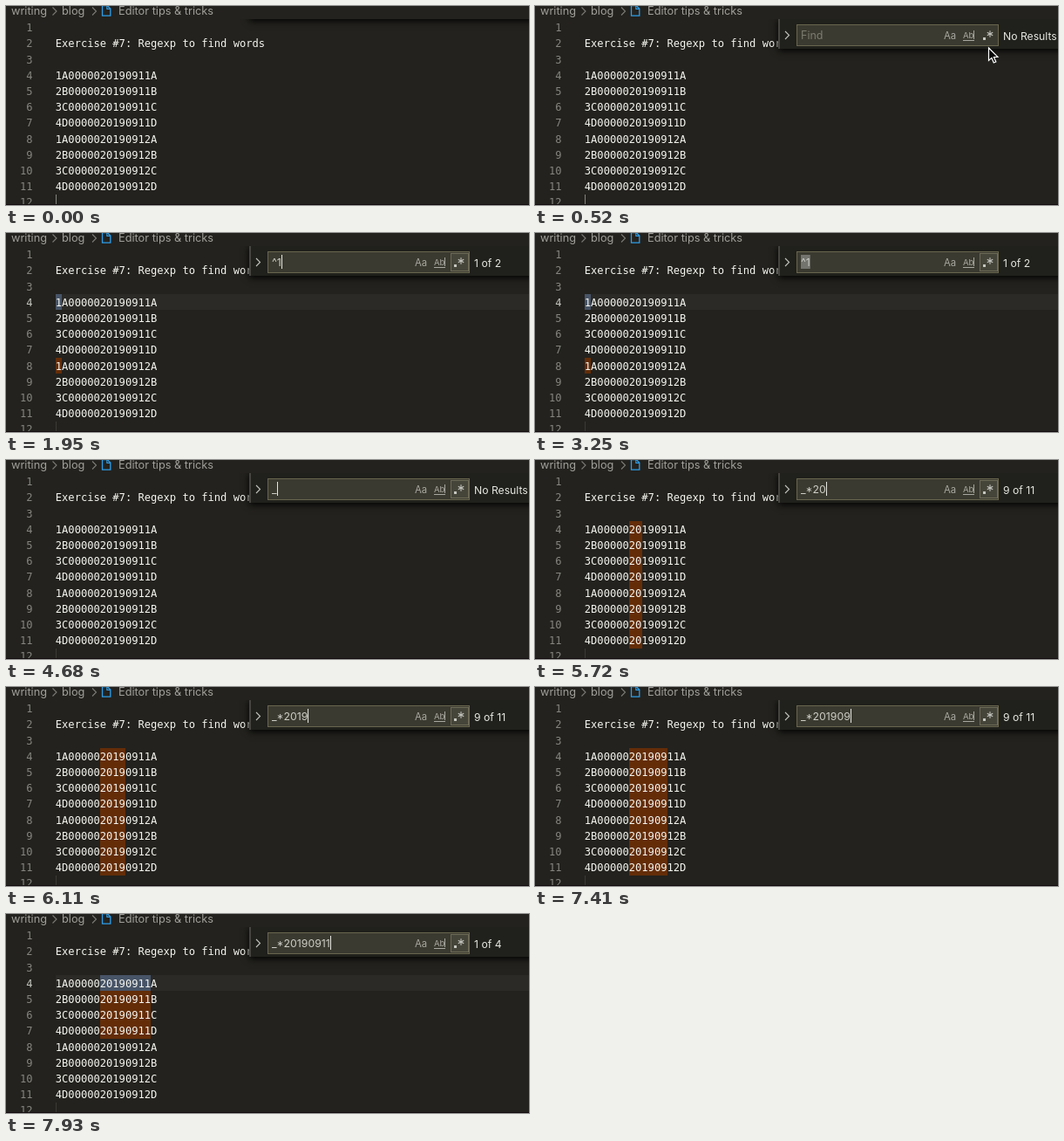
These frames come from a looping animation (600x228 px, 8 s). An HTML page with a canvas:

```html
<!DOCTYPE html>
<html lang="en">
<head>
<meta charset="utf-8">
<title>Regexp search</title>
<style>
html, body { margin: 0; width: 100%; height: 100%; overflow: hidden; background: #23221e; }
canvas { display: block; }
</style>
</head>
<body>
<canvas id="stage"></canvas>
<script>
const W = 600, H = 228, LOOP = 8000, STEP = 130;
const canvas = document.getElementById('stage'), ctx = canvas.getContext('2d');
const ratio = window.devicePixelRatio || 1;
canvas.width = W * ratio;
canvas.height = H * ratio;
canvas.style.width = W + 'px';
canvas.style.height = H + 'px';

const UI = 'Inter, Roboto, sans-serif';
const MONO = '12.1px "DejaVu Sans Mono", monospace';
const CHAR = 7.28, LEFT = 56.8, PITCH = 18.2;
const lineTop = n => Math.round(70 + (n - 4) * PITCH);
const baseline = n => 83.7 + (n - 4) * PITCH;
const column = c => Math.round(57 + c * CHAR);

const lines = ['', 'Exercise #7: Regexp to find words', ''];
for (const day of ['11', '12'])
  ['1A', '2B', '3C', '4D'].forEach(id => lines.push(id + '00000201909' + day + id[1]));
lines.push('');

// time, search text, counter, active line, text selected
const states = [
  [0, '', 'No Results', 0],
  [1040, '', 'No Results', 0],
  [1690, '^', '12 of 23', 0],
  [1820, '^1', '1 of 2', 4],
  [2210, '^1', '2 of 2', 8],
  [2730, '^1', '1 of 2', 4],
  [3120, '^1', '1 of 2', 4, true],
  [4290, '_', 'No Results', 4],
  [4550, '_', 'No Results', 0],
  [5200, '_*', '176 of 423', 0],
  [5460, '_*2', '9 of 17', 0],
  [5590, '_*20', '9 of 11', 0],
  [5850, '_*201', '9 of 11', 0],
  [5980, '_*2019', '9 of 11', 0],
  [7020, '_*20190', '9 of 11', 0],
  [7280, '_*201909', '9 of 11', 0],
  [7670, '_*2019091', '9 of 11', 0],
  [7930, '_*20190911', '1 of 4', 4]
];

// time, x, y of the pointer tip
const moves = [[260, 476, 177], [390, 508, 96], [520, 520.5, 48], [650, 520, 37], [780, 518, 29]];

function text(str, x, y, color, font, align = 'left') {
  ctx.font = font;
  ctx.fillStyle = color;
  ctx.textAlign = align;
  ctx.fillText(str, x, y);
}

function box(x, y, w, h, fill) {
  ctx.fillStyle = fill;
  ctx.fillRect(x, y, w, h);
}

function frame(x, y, w, h, color) {
  ctx.strokeStyle = color;
  ctx.lineWidth = 1;
  ctx.strokeRect(x + 0.5, y + 0.5, w - 1, h - 1);
}

function path(points, color, width = 1.1) {
  ctx.beginPath();
  points.forEach(([x, y]) => ctx.lineTo(x, y));
  ctx.strokeStyle = color;
  ctx.lineWidth = width;
  ctx.stroke();
}

function chevron(x, y, color) {
  path([[x, y - 4.5], [x + 4.5, y], [x, y + 4.5]], color);
}

// Cells rounded to whole pixels leave a thin seam every four or five columns.
const seamsUpTo = c => Math.floor(c * 0.235 + 0.36);

function drawMatch(match, n, active) {
  const from = match.index, to = from + Math.max(1, match[0].length);
  const x = column(from), y = lineTop(n), h = lineTop(n + 1) - y;
  box(x, y, column(to) - x, h, n === active ? '#475467' : '#642d08');
  if (!match[0] && seamsUpTo(from) > seamsUpTo(from - 1)) box(x, y, 1, h, '#462510');
}

function drawEditor(t, query, active) {
  if (active) box(57, lineTop(active), W, 18, '#2b2a27');
  const regexp = query && new RegExp(query, 'g');
  lines.forEach((line, i) => {
    const n = i + 1;
    if (regexp) for (const match of line.matchAll(regexp)) drawMatch(match, n, active);
    text(n, 30.5, baseline(n), n === active ? '#c4c4be' : '#85847e', MONO, 'right');
    text(line, LEFT, baseline(n), '#f5f5ef', MONO);
  });
  box(57, 216, 1, 11, t < 1690 ? '#85857e' : '#3b3a35');
}

function drawBreadcrumb() {
  const font = '12.75px ' + UI, color = '#a09f99', blue = '#2f9ee8';
  box(0, 0, W, 15, '#23221e');
  text('writing', 6, 10, color, font);
  chevron(53.5, 6, '#7c7b76');
  text('blog', 64, 10, color, font);
  chevron(99, 6, '#7c7b76');
  path([[117, -0.5], [110.5, -0.5], [110.5, 11.2], [119.8, 11.2], [119.8, 3], [116, -0.5]], blue, 1.3);
  path([[115.8, 0], [115.8, 3.4], [119.8, 3.4]], blue);
  text('Editor tips & tricks', 129, 10, color, font);
}

function drawWidget(t, [since, query, count, , selected]) {
  const slide = Math.min(1, t / 260);
  ctx.save();
  ctx.beginPath();
  ctx.rect(0, 15, W, H);
  ctx.clip();
  ctx.translate(0, (slide - 1) * 34);
  ctx.shadowColor = '#000';
  ctx.shadowBlur = 8 * ratio;
  ctx.shadowOffsetY = 2 * ratio;
  box(279, 14, 330, 35, '#20201c');
  ctx.shadowColor = 'transparent';
  box(279, 14, 2, 35, '#45443f');

  chevron(287, 33.5, '#c5c5c0');
  box(300, 21, 232, 25, '#3b3a30');
  frame(300, 21, 232, 25, '#68664e');

  const font = '12.3px ' + UI;
  ctx.font = font;
  const width = ctx.measureText(query).width;
  if (selected) box(305, 25, width, 16, '#74746f');
  if (query) text(query, 305, 38, '#cdcdc6', font);
  else text('Find', 305, 38, '#7d7c70', '12.5px ' + UI);
  const lit = Math.floor((t - since) / 500) % 2 === 0;
  if (t >= 1040 && !selected && lit) box(Math.round(305 + width), 25, 1, 16, '#e6e6e0');

  const icon = '#a9a8a0';
  text('Aa', 469, 37.5, icon, '11.3px ' + UI);
  text('Ab', 491, 37, icon, '9.6px ' + UI);
  box(503, 28, 1, 10, icon);
  box(491, 39, 13, 1, icon);
  if (t >= 1040) {
    box(510, 23, 21, 21, '#46453a');
    frame(510, 23, 21, 21, '#6d6b57');
  }
  box(514, 36, 3, 3, '#c6c6c0');
  for (let a = 0; a < 3; a++) {
    const dx = 3.7 * Math.sin(a * Math.PI / 3), dy = 3.7 * Math.cos(a * Math.PI / 3);
    path([[522 - dx, 32 - dy], [522 + dx, 32 + dy]], '#c6c6c0', 1.1);
  }
  text(count, 537, 38.5, '#e6e6e0', '12.2px ' + UI);
  ctx.restore();
}

function drawPointer(t) {
  if (t < 260 || t >= 1690) return;
  const [, x, y] = moves.findLast(m => m[0] <= t);
  ctx.save();
  ctx.translate(x, y);
  ctx.beginPath();
  [[0, 0], [0, 14.5], [3.4, 11.4], [5.8, 17], [8.3, 16], [5.9, 10.5], [10.4, 10.4]]
    .forEach(p => ctx.lineTo(...p));
  ctx.closePath();
  ctx.fillStyle = '#080808';
  ctx.fill();
  ctx.strokeStyle = '#fff';
  ctx.lineWidth = 1.2;
  ctx.stroke();
  ctx.restore();
}

function draw(now) {
  const t = Math.floor((now % LOOP) / STEP) * STEP;
  const state = states.findLast(s => s[0] <= t);
  ctx.setTransform(ratio, 0, 0, ratio, 0, 0);
  box(0, 0, W, H, '#23221e');
  drawEditor(t, state[1], state[3]);
  drawBreadcrumb();
  drawWidget(t, state);
  box(0, 227, W, 1, '#130d0f');
  drawPointer(t);
}

const start = performance.now();
function tick() {
  draw(performance.now() - start);
  requestAnimationFrame(tick);
}
tick();
</script>
</body>
</html>
```
